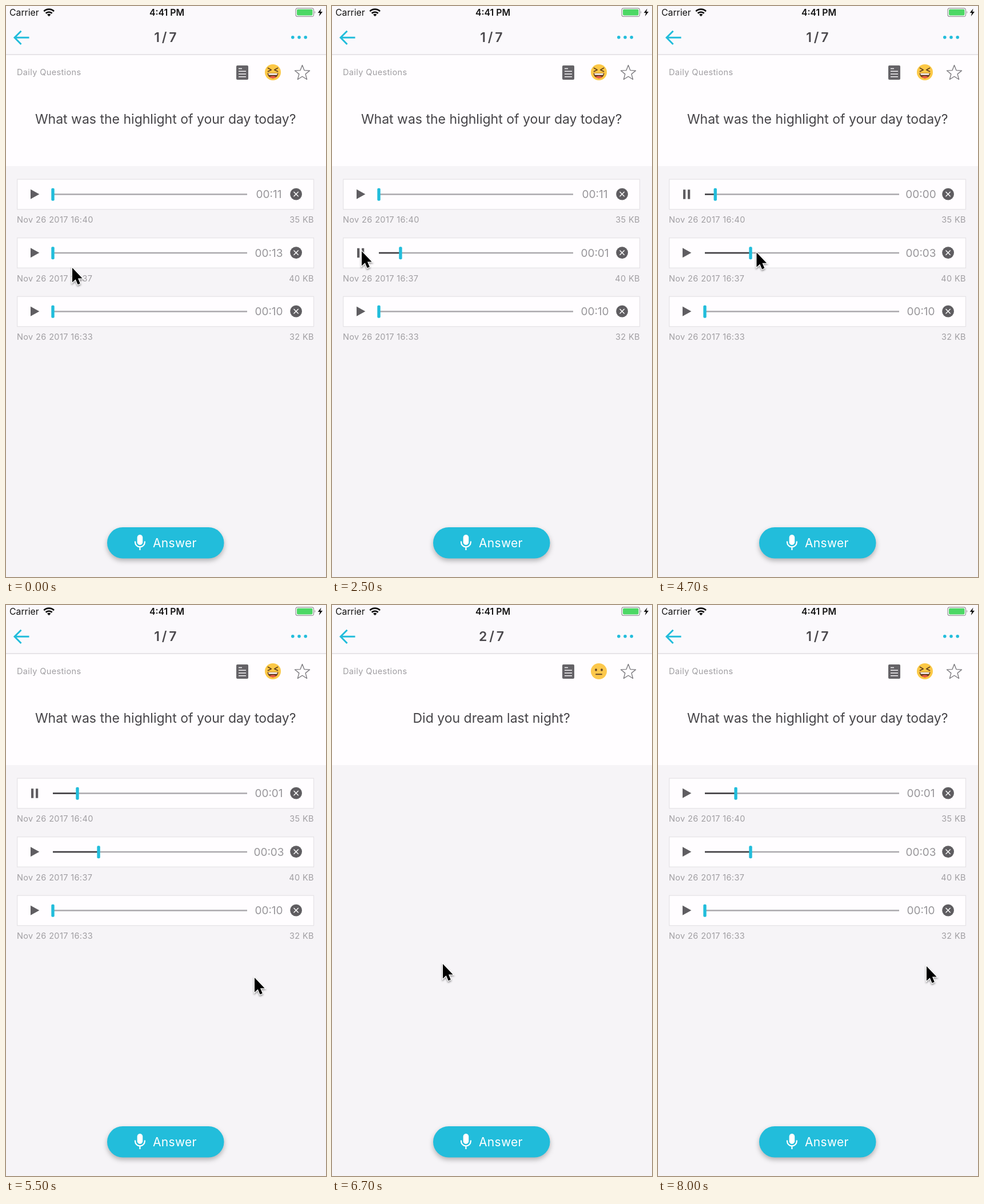
An HTML page that plays this animation: 560 by 999 pixels, repeating every 8100 ms.

```html
<!DOCTYPE html>
<html lang="en">
<head>
<meta charset="utf-8">
<title>Daily questions</title>
<style>
  html, body { margin: 0; width: 100%; height: 100%; overflow: hidden; background: #f6f4f7; }
  svg { display: block; width: 560px; height: 999px; font-family: Inter, sans-serif; }
  .small { font-size: 14.5px; letter-spacing: .38px; fill: #a09ea2; }
  .time { font-size: 19px; fill: #979599; text-anchor: middle; }
  .ask { font-size: 23px; fill: #464448; text-anchor: middle; }
  .title { font-size: 23px; font-weight: 600; fill: #4a484c; text-anchor: middle; word-spacing: -2px; }
  .status { font-size: 15.8px; fill: #111; }
  .answer { font-size: 21px; letter-spacing: .3px; fill: #fff; }
  .button { filter: drop-shadow(0 4px 4px rgba(0, 0, 0, .28)); }
  #cursor { filter: drop-shadow(0 2px 1.5px rgba(0, 0, 0, .4)); }
</style>
</head>
<body>
<svg viewBox="0 0 560 999">
  <defs>
    <g id="doc">
      <rect x="403" y="104" width="21" height="25" rx="2" fill="#656367"/>
      <path d="M407 109.5H413M407 114.3H420M407 119H420M407 123.7H420" stroke="#f4f2f5" stroke-width="1.5"/>
    </g>
    <path id="star" d="" fill="none" stroke="#77757a" stroke-width="1.3" stroke-linejoin="round"/>
    <g id="laugh">
      <circle cx="467" cy="116" r="14" fill="#fcc846"/>
      <path d="M458.5 108.5L464.2 111.7 458.5 114.6M475.5 108.5L469.8 111.7 475.5 114.6" fill="none" stroke="#68441f" stroke-width="1.8" stroke-linecap="round" stroke-linejoin="round"/>
      <path d="M457.5 117.5H476.5C476 123 472 126.5 467 126.5S458 123 457.5 117.5Z" fill="#6b3d20"/>
      <path d="M459 118H475L474 120.5H460Z" fill="#fff"/>
      <path d="M461 124.5Q467 120.5 473 124.5Q467 128.5 461 124.5Z" fill="#ed5a45"/>
    </g>
    <g id="neutral">
      <circle cx="467" cy="116" r="14" fill="#fcc84c"/>
      <g fill="#68482a">
        <ellipse cx="462" cy="113.5" rx="1.9" ry="2.2"/>
        <ellipse cx="472" cy="113.5" rx="1.9" ry="2.2"/>
        <rect x="461" y="120.3" width="12" height="2" rx="1"/>
      </g>
    </g>
    <g id="answer">
      <rect class="button" x="177" y="912" width="204.5" height="54.5" rx="27.2" fill="#22bddb"/>
      <rect x="229.6" y="925" width="9.6" height="18" rx="4.8" fill="#fff"/>
      <path d="M226 936.5V938A8.4 8.4 0 0 0 242.8 938V936.5M234.4 946.5V952" fill="none" stroke="#fff" stroke-width="2.2"/>
      <text class="answer" x="257" y="946.5">Answer</text>
    </g>
  </defs>

  <rect width="560" height="999" fill="#e9e7e8"/>
  <g id="first"></g>
  <g id="second"></g>

  <rect width="560" height="85" fill="#fbf9fc"/>
  <path d="M0 85H560" stroke="#dfdde1" stroke-width="1.3"/>
  <text class="status" x="6" y="17">Carrier</text>
  <g fill="none" stroke="#111" stroke-width="2.7">
    <path d="M66.3 9.3A12.6 12.6 0 0 1 84 9.3M69.6 12.8A8 8 0 0 1 80.7 12.8"/>
    <path d="M75.2 18.3L72 15A4.6 4.6 0 0 1 78.4 15Z" fill="#111" stroke="none"/>
  </g>
  <text class="status" x="281.5" y="17" text-anchor="middle" font-weight="600">4:41 PM</text>
  <rect x="507" y="3.8" width="31.5" height="14.6" rx="3.5" fill="none" stroke="#98969a" stroke-width="1.2"/>
  <rect x="509" y="5.8" width="27.5" height="10.6" rx="1.8" fill="#4cd865"/>
  <path d="M540.2 8.5Q542.4 11 540.2 13.5Z" fill="#98969a"/>
  <path d="M551.5 4.5L545.7 12H549.3L547.8 18 554 10H550.2Z" fill="#111"/>
  <path d="M40.5 55.3H15.5M26.5 43.7L15 55.3 26.5 67" fill="none" stroke="#22bddb" stroke-width="3"/>
  <g fill="#22bddb"><circle cx="501.8" cy="54.7" r="2.8"/><circle cx="513" cy="54.7" r="2.8"/><circle cx="524.2" cy="54.7" r="2.8"/></g>
  <text class="title" id="title" x="279" y="63.3">1 / 7</text>

  <path id="cursor" d="M0 0V25.5L5.8 20.3 9.6 29.2 13.8 27.4 10 18.5H17.6Z" fill="#000" stroke="#fff" stroke-width="2.6" paint-order="stroke"/>
</svg>
<script>
const $ = id => document.getElementById(id);
const LOOP = 8100, STEP = 100, PITCH = 574;
const TRACK = { x: 82, w: 340 };

// start and stop are when playback runs, in ms
const rows = [
  { y: 329.5, secs: 11, date: '16:40', size: 35, start: 4110, stop: 5860 },
  { y: 432, secs: 13, date: '16:37', size: 40, start: 1050, stop: 4110 },
  { y: 534.5, secs: 10, date: '16:33', size: 32, start: Infinity, stop: Infinity }
];

// time, x, y
const path = [
  [0, 116, 458], [200, 112, 455], [700, 52, 429], [2800, 52, 429],
  [3600, 58, 346], [3700, 57, 343], [4000, 51, 329], [4400, 51, 329],
  [5200, 435, 652], [5800, 435, 652], [6000, 203, 645], [6100, 203, 644],
  [6500, 194, 628], [6700, 194, 628], [7000, 470, 632], [LOOP, 470, 632]
];

const clamp = (v, lo, hi) => Math.min(hi, Math.max(lo, v));
const clock = s => '00:' + String(Math.floor(s)).padStart(2, '0');

function cursorAt(t) {
  const i = path.findIndex(p => p[0] > t);
  const [a, b] = [path[i - 1], path[i]];
  const k = (t - a[0]) / (b[0] - a[0]), s = k * k * (3 - 2 * k);
  return [a[1] + (b[1] - a[1]) * s, a[2] + (b[2] - a[2]) * s];
}

// Pages follow the drag, then glide to rest
function scrollAt(t) {
  const glide = since => {
    const r = Math.exp(-(t - since) / 70.4);
    return r < .01 ? 0 : r;
  };
  if (t < 5800) return 0;
  if (t < 6000) return 435 - cursorAt(t)[0];
  if (t < 6700) return PITCH - 339 * glide(6000);
  if (t < 7000) return PITCH - (cursorAt(t)[0] - 194);
  return 298 * glide(7000);
}

const page = (face, ask, body = '') => `
  <rect x="-2.5" y="85" width="562.5" height="914" fill="#f6f4f7"/>
  <rect x="-2.5" y="85" width="562.5" height="195" fill="#fffdff"/>
  <text class="small" x="19" y="121">Daily Questions</text>
  <use href="#doc"/><use href="#${face}"/><use href="#star"/>
  <text class="ask" x="279.2" y="206">${ask}</text>
  ${body}<use href="#answer"/>`;

const rowMarkup = (r, i) => `<g transform="translate(0 ${r.y})">
  <rect x="19.7" y="-26.3" width="518.8" height="52.6" fill="#fffdff" stroke="#e6e4e7" stroke-width="1.3"/>
  <path id="icon${i}" fill="#5f5d61"/>
  <path d="M${TRACK.x} 0h${TRACK.w}" stroke="#aaa8ac" stroke-width="2.4"/>
  <path id="done${i}" stroke="#3f3d41" stroke-width="2.4"/>
  <rect id="thumb${i}" y="-10.7" width="5.4" height="22" rx="2" fill="#22bddb"/>
  <text class="time" id="time${i}" x="460" y="6.8"></text>
  <circle cx="507.6" cy="-.4" r="10.4" fill="#5f5d61"/>
  <path d="M503.5 -4.5l8.2 8.2m0 -8.2l-8.2 8.2" stroke="#fff" stroke-width="1.4"/>
  <text class="small" x="19" y="49.5">Nov 26 2017 ${r.date}</text>
  <text class="small" x="539" y="49.5" text-anchor="end">${r.size} KB</text>
</g>`;

const PLAY = 'M43 -8.8L58.3 -.3 43 8.2Z', PAUSE = 'M44 -8.3h4.2v16.6h-4.2zM52 -8.3h4.2v16.6h-4.2z';

$('star').setAttribute('d', 'M' + Array.from({ length: 10 }, (_, i) => {
  const r = i % 2 ? 5.9 : 13.8, a = (i / 5 - .5) * Math.PI;
  return [518.5 + r * Math.cos(a), 117.3 + r * Math.sin(a)].map(v => v.toFixed(2));
}).join('L') + 'Z');
$('first').innerHTML = page('laugh', 'What was the highlight of your day today?', rows.map(rowMarkup).join(''));
$('second').innerHTML = page('neutral', 'Did you dream last night?');

function draw(t) {
  rows.forEach((r, i) => {
    const begun = t >= r.start;
    const secs = begun ? (clamp(t, r.start, r.stop) - r.start) / 1000 : 0;
    const w = TRACK.w * secs / r.secs;
    $('icon' + i).setAttribute('d', begun && t < r.stop ? PAUSE : PLAY);
    $('done' + i).setAttribute('d', `M${TRACK.x} 0h${w}`);
    $('thumb' + i).setAttribute('x', TRACK.x - 2.7 + w);
    $('time' + i).textContent = clock(begun ? secs : r.secs);
  });
  const shift = scrollAt(t);
  $('first').setAttribute('transform', `translate(${-shift})`);
  $('second').setAttribute('transform', `translate(${PITCH - shift})`);
  $('title').textContent = t >= 6400 && t < 7300 ? '2 / 7' : '1 / 7';
  $('cursor').setAttribute('transform', `translate(${cursorAt(t)})`);
}

const origin = performance.now();
function tick() {
  const t = (performance.now() - origin) % LOOP;
  draw(Math.floor(t / STEP) * STEP);
  requestAnimationFrame(tick);
}
tick();
</script>
</body>
</html>
```
